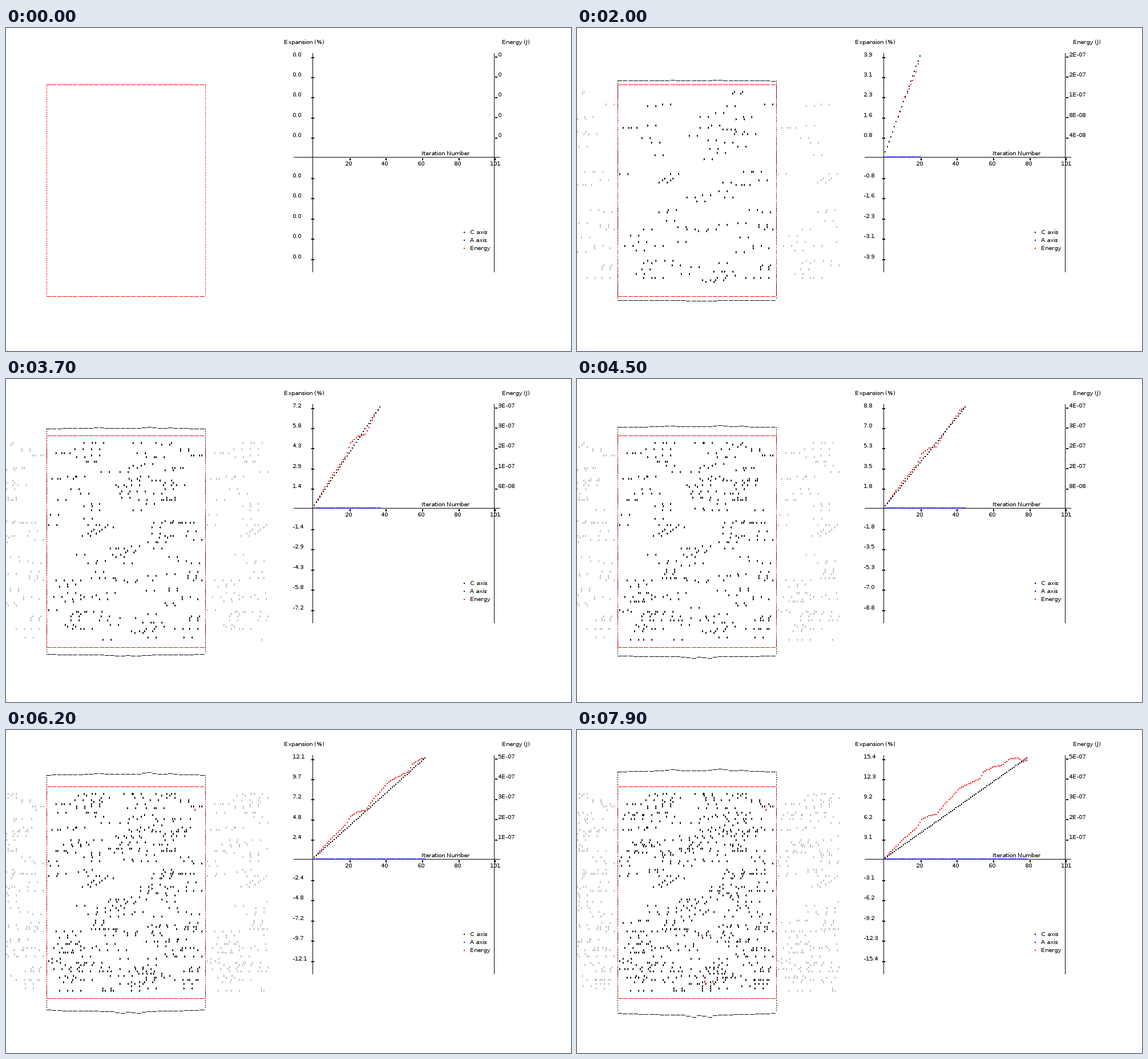
Write a matplotlib script that moves like this. It is 990 by 566 pixels and loops after 8 s.

```python
import matplotlib.pyplot as plt
import numpy as np
from matplotlib.animation import FuncAnimation
from matplotlib.collections import LineCollection

plt.rcParams.update({
    "font.family": "DejaVu Sans",
    "text.hinting": "native",
    "text.hinting_factor": 1,
})

W, H, DPI = 990, 566, 100
PX = 72 / DPI
FRAMES = 80
LEFT, RIGHT, TOP, BOTTOM = 71, 349, 99, 470
PERIOD = RIGHT - LEFT
CELLS, LAYERS = 30, 100
PAIR, PAIRS_PER_STEP = 13, 4.8
ORIGIN_X, ORIGIN_Y, STEP_X, PLOT_H = 537.2, 226, 3.18, 177
STRAIN, PEAK_ENERGY = 0.1948, 5.3e-7

fig = plt.figure(figsize=(W / DPI, H / DPI), dpi=DPI, facecolor="white")
ax = fig.add_axes([0, 0, 1, 1])
ax.set(xlim=(0, W), ylim=(H, 0))
ax.axis("off")


def strokes(color, width=1, z=2, segs=()):
    """Crisp lines placed exactly on the pixel grid."""
    lines = LineCollection(list(segs), colors=color, linewidths=width * PX,
                           antialiaseds=False, capstyle="butt", snap=False, zorder=z)
    ax.add_collection(lines)
    return lines


def label(x, y, text=""):
    return ax.text(x, y, text, fontsize=10 * PX, va="baseline", ha="left")


def dots(xs, ys):
    return [[(x - 1, y), (x + 1, y)] for x, y in zip(np.round(xs), np.round(ys))]


# Chart: axes, ticks and labels
strokes("black", segs=[
    [(537.5, 44), (537.5, 428)],
    [(855.5, 44), (855.5, 428)],
    [(504, 226.5), (866, 226.5)],
])
rows = [k for k in range(11) if k != 5]
row_y = [int(35.4 * k) for k in range(11)]
ticks = [[(535, 52 + row_y[k]), (540, 52 + row_y[k])] for k in rows]
ticks += [[(857, 51 + int(35.5 * k)), (861, 51 + int(35.5 * k))] for k in range(5)]
ticks += [[(603 + int(63.7 * k), 228), (603 + int(63.7 * k), 232)] for k in range(5)]
strokes("black", 2, segs=ticks)

label(487, 28, "Expansion (%)")
label(869, 28, "Energy (J)")
label(728, 223, "Iteration Number")
for k, text in enumerate(("20", "40", "60", "80", "101")):
    label(594 + int(63.7 * k), 241, text)
for k, (text, color) in enumerate((("C axis", "black"), ("A axis", "blue"), ("Energy", "red"))):
    label(813, 361 + 14 * k, text)
    strokes(color, 2, segs=dots([803], [358 + 14 * k]))

strain_labels = [label(502, 50 + row_y[k]) for k in rows]
energy_labels = [label(862, 50 + row_y[k]) for k in range(5)]

# Energy climbs steadily, with a few plateaus
knots = [(0, 0), (11, 35), (18, 54), (21, 69), (25, 76), (29, 78), (34, 97), (42, 124),
         (53, 141), (55, 152), (60, 161), (65, 164), (70, 176), (74, 177), (77, 170), (79, 173)]
energy = np.interp(np.arange(FRAMES), *zip(*knots))

energy_dots = strokes("red", 2, 4)
strain_dots = strokes("black", 2, 5)
flat_dots = strokes("blue", 2, 6)


# Crystal outline
def swell(x, height, bumps):
    """Final rise of a surface: a rounded plateau with local bumps."""
    u = np.clip((x - LEFT) / PERIOD, 0, 1)
    plateau = 25 + height * np.sqrt(np.sin(np.pi * u))
    return plateau + sum(h * np.exp(-((x - c) / w) ** 2) for c, h, w in bumps)


def top(x, grow):
    return TOP - grow * swell(x, 3, [(165, 2, 12), (250, 3.5, 13), (290, 2, 11)])


def bottom(x, grow):
    return BOTTOM + grow * swell(x, 4, [(203, 4, 10), (232, 4, 11)])


def outline(grow):
    """Broken top and bottom surfaces plus dotted sides."""
    pitch = PERIOD / CELLS
    segs = []
    for x in np.round(LEFT + pitch * np.arange(CELLS)):
        for edge in (top, bottom):
            y = np.floor(edge(x + pitch / 2, grow) + 0.5) + 0.5
            segs.append([(x, y), (x + 8, y)])
    for x in (LEFT, RIGHT):
        for y in np.linspace(top(x, grow), bottom(x, grow), LAYERS, endpoint=False):
            segs.append([(x + 0.5, int(y)), (x + 0.5, int(y) + 2)])
    return segs


surface = strokes("black", z=2)
strokes("red", z=3, segs=outline(0))

# Defect pairs scattered over the layers, leaving a few calm areas
calm = [(215, 265, 24), (105, 285, 28), (230, 390, 24), (190, 140, 24), (330, 305, 16)]


def scatter_pairs(rng, count):
    found = []
    while len(found) < count:
        x = 75 + int(3.3 * rng.integers(78))
        y = 112 + int(3.71 * rng.integers(94))
        if all(np.hypot(x + 6 - a, y - b) > r for a, b, r in calm):
            found.append((x, y))
    return found


pairs = scatter_pairs(np.random.default_rng(12), int(PAIRS_PER_STEP * FRAMES))

# (x, y, direction, birth)
red_ends = [(330, 140, -1, 60), (219, 360, 1, 63), (232, 360, -1, 63),
            (224, 441, 1, 74), (237, 441, -1, 74)]


def glyph(x, y, way):
    """Small arrowhead: an upright bar with a short stub."""
    bar = x - way + 0.5
    stub = bar + way
    return [[(bar, y - 2), (bar, y + 2)], [(stub, y - 1), (stub, y + 1)]]


def defect_ends(n):
    """Facing ends that meet on one layer cancel out."""
    starts = set(pairs[:int(PAIRS_PER_STEP * n)])
    stops = {(x + PAIR, y) for x, y in starts}
    return ([(x, y, 1) for x, y in sorted(starts - stops)]
            + [(x, y, -1) for x, y in sorted(stops - starts)])


def ghosts(ends):
    for x, y, way in ends:
        if x + PERIOD < 459:
            yield x + PERIOD, y, way
        if x - PERIOD >= 0:
            yield x - PERIOD, y, way


def glyphs(ends):
    return [seg for end in ends for seg in glyph(*end)]


ghost_marks = strokes("#b8b8b8", z=1)
defect_marks = strokes("black", z=4)
red_marks = strokes("red", z=5)


def draw(n):
    surface.set_segments(outline(n / (FRAMES - 1)))
    ends = defect_ends(n)
    red = [end[:3] for end in red_ends if end[3] <= n]
    defect_marks.set_segments(glyphs(ends))
    red_marks.set_segments(glyphs(red))
    ghost_marks.set_segments(glyphs(ghosts(ends + red)))

    step = np.arange(1, n + 1)
    x = ORIGIN_X + STEP_X * step
    peak = max(energy[:n + 1].max(), 1)
    strain_dots.set_segments(dots(x, ORIGIN_Y - PLOT_H * step / max(n, 1)))
    energy_dots.set_segments(dots(x, ORIGIN_Y - PLOT_H * energy[1:n + 1] / peak))
    flat_dots.set_segments(dots(x, np.full(n, ORIGIN_Y)))

    for k, text in zip(rows, strain_labels):
        text.set_text(f"{STRAIN * n * (5 - k) / 5 + 0:.1f}")
    for k, text in enumerate(energy_labels):
        value = PEAK_ENERGY * peak / PLOT_H * (5 - k) / 5
        text.set_text(f"{value:.0E}" if n else "0")
    return []


anim = FuncAnimation(fig, draw, frames=FRAMES, interval=100, repeat=True,
                     repeat_delay=0, init_func=lambda: draw(0), blit=False)
plt.show()
```
